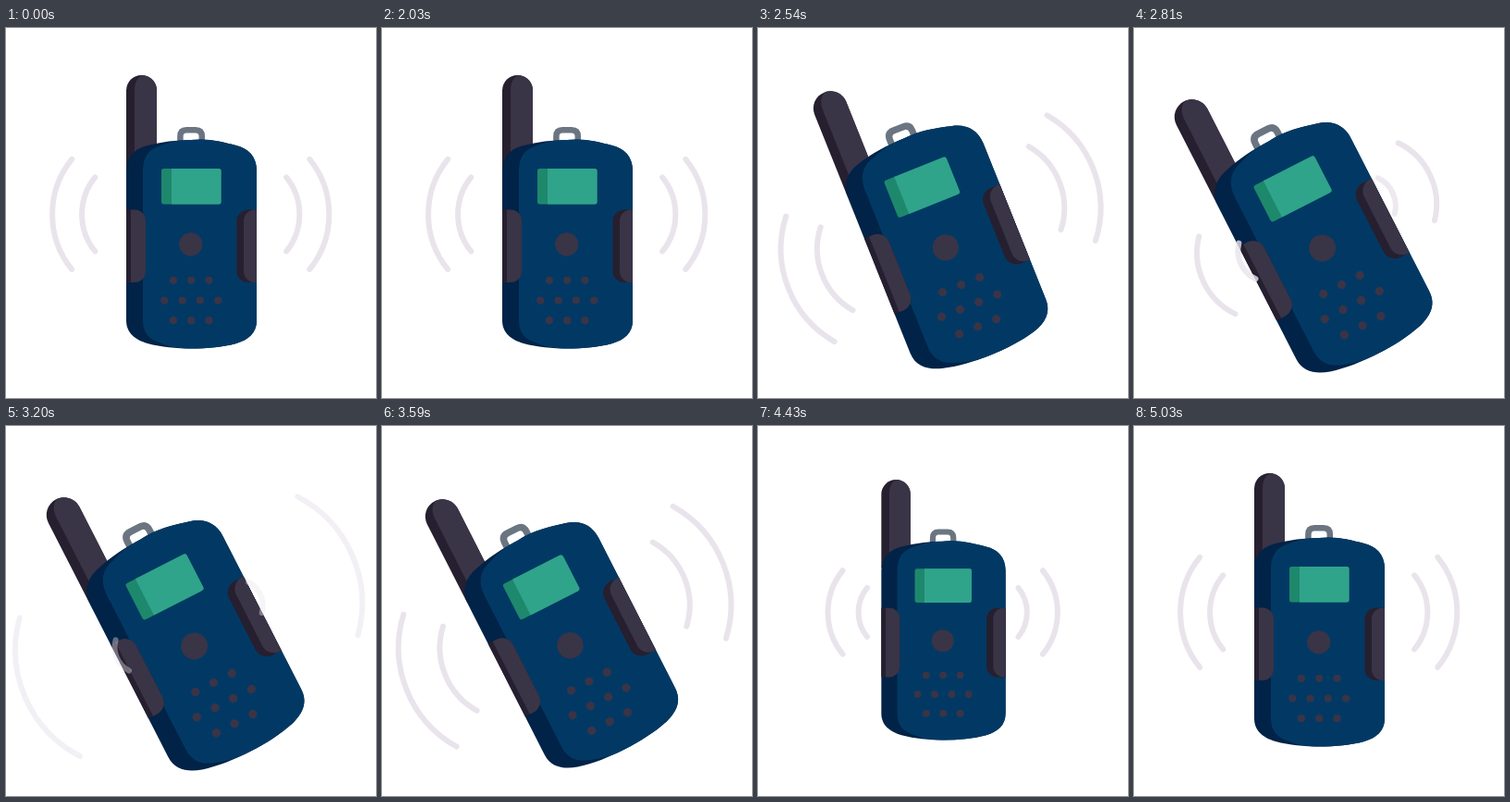
An HTML page with a canvas that plays this animation: 400x400 px, repeating every 5060 ms.

```html
<!DOCTYPE html>
<html lang="en">
<head>
<meta charset="utf-8">
<title>Walkie-talkie</title>
<style>
html, body { margin: 0; width: 100%; height: 100%; overflow: hidden; background: #fff; }
canvas { display: block; width: 400px; height: 400px; }
</style>
</head>
<body>
<canvas id="stage"></canvas>
<script>
const canvas = document.getElementById('stage');
const ctx = canvas.getContext('2d');
const dpr = window.devicePixelRatio || 1;
canvas.width = canvas.height = 400 * dpr;

const LOOP = 5060, START = 2030, END = 5030;
const BODY = '#023964', SIDE = '#002347', DARK = '#261f2f', GREY = '#3a3447';
const WAVE = '#e9e4ec', SPEED = 0.135, SPAN = 39 * Math.PI / 180;

const clamp = x => Math.max(0, Math.min(1, x));
const ease = x => (1 - Math.cos(Math.PI * clamp(x))) / 2;
const phase = (t, from, to) => ease((t - from) / (to - from));

// Birth times of each pulse: outer arc, inner arc, tilted with the device or not
const pulses = [
  [2060, 2222, true],
  [2512, 2673, true],
  [3084, 3268, true],
  [4080, 4225, false],
  [4589, 4734, false]
];

function fillPath(color, d) {
  ctx.fillStyle = color;
  ctx.fill(new Path2D(d));
}

function box(color, x, y, w, h, r) {
  ctx.fillStyle = color;
  ctx.beginPath();
  ctx.roundRect(x, y, w, h, r);
  ctx.fill();
}

function dot(x, y, r) {
  ctx.fillStyle = GREY;
  ctx.beginPath();
  ctx.arc(x, y, r, 0, 7);
  ctx.fill();
}

function drawDevice() {
  // antenna
  box(DARK, 130, 51, 33, 100, [16.5, 16.5, 0, 0]);
  fillPath(GREY, 'M139 151V67C139 59 142 53 148 51C157 52 163 59 163 67V151Z');

  // strap loop
  ctx.strokeStyle = '#6b7582';
  ctx.lineWidth = 6.5;
  ctx.stroke(new Path2D('M188.4 126V117Q188.4 110.2 195 110.2H205Q211.8 110.2 211.8 117V126'));

  // case
  const right = 'C218 119 234 123 249 127C262 130 271 139 271 154V316' +
    'C271 330 262 337 249 341C234 345 218 346.5 201 346.5';
  fillPath(SIDE, 'M200 121' + right + 'C184 346.5 168 345 153 341C140 337 130 330 130 316V154' +
    'C130 139 140 130 153 127C168 123 184 121 200 121Z');
  fillPath(BODY, 'M200 121' + right + 'C188 346.5 178 345 168 341C155 337 148 330 148 316V154' +
    'C148 139 155 130 168 127C178 123 188 121 200 121Z');

  // grips
  box(DARK, 130, 196.5, 21, 78.5, [0, 12, 12, 0]);
  box(GREY, 135, 196.5, 16, 78.5, [0, 12, 12, 0]);
  box(DARK, 249.5, 196.5, 21.5, 78.5, [12, 0, 0, 12]);
  box(GREY, 257, 196.5, 14, 78.5, [12, 0, 0, 12]);

  // screen
  box('#1e886c', 168, 152, 64.5, 38.5, 2.5);
  box('#30a38b', 179, 152, 53.5, 38.5, [0, 2.5, 2.5, 0]);

  // button and speaker
  dot(199.7, 233.8, 12.6);
  for (let row = 0; row < 3; row++) {
    const n = row === 1 ? 4 : 3;
    for (let i = 0; i < n; i++) dot(200.2 + (i - (n - 1) / 2) * 19.3, 272.8 + row * 21.7, 4.1);
  }
}

// A mirrored pair of arcs; size is half the chord before scaling
function drawArcs(size, scale, tilt, tilted, drift = 0) {
  const alpha = Math.min(clamp((size - 13) / 7), clamp((74 - size) / 5));
  if (alpha <= 0) return;
  const r = size * scale * 1.59;
  const c = Math.min(55, 45.6 + 0.21 * size) * scale + drift;
  ctx.save();
  ctx.globalAlpha = alpha;
  ctx.strokeStyle = WAVE;
  ctx.lineWidth = 6;
  ctx.lineCap = 'round';
  if (tilted) {
    ctx.translate(197.6, 216.7);
    ctx.rotate(tilt);
  } else {
    ctx.translate(199.7, 201.4);
  }
  ctx.beginPath();
  ctx.arc(c, 0, r, -SPAN, SPAN);
  ctx.stroke();
  ctx.beginPath();
  ctx.arc(-c, 0, r, Math.PI - SPAN, Math.PI + SPAN);
  ctx.stroke();
  ctx.restore();
}

function drawWaves(t, scale, turn) {
  const dt = t - START, x = dt / 300;
  drawArcs(59.5 + 14.5 * x * x, scale, 0, false, dt * 0.01);
  drawArcs(40 + 8 * x ** 3, scale, 0, false, dt * 0.01);
  const tilt = turn * (1 - 0.19 * clamp((t - 2330) / 1260));
  for (const [outer, inner, tilted] of pulses) {
    for (const born of [outer, inner]) {
      drawArcs((t - born) * SPEED, scale, tilt, tilted);
    }
  }
}

function draw(now) {
  let t = now % LOOP;
  if (t < START || t >= END) t = START;

  const scale = 1 + 0.145 * phase(t, 2030, 2740) - 0.227 * phase(t, 3470, 4090) +
    0.082 * phase(t, 4090, 4850);
  const turn = -27.1 * Math.PI / 180 * (phase(t, 2030, 2750) - phase(t, 3570, 4100));

  ctx.setTransform(dpr, 0, 0, dpr, 0, 0);
  ctx.fillStyle = '#fff';
  ctx.fillRect(0, 0, 400, 400);

  ctx.save();
  ctx.translate(200, 200);
  ctx.scale(scale, scale);
  ctx.translate(0, 26.3);
  ctx.rotate(turn);
  ctx.translate(-200, -226.3);
  drawDevice();
  ctx.restore();

  drawWaves(t, scale, turn);
}

const origin = performance.now();
function tick() {
  draw(performance.now() - origin);
  requestAnimationFrame(tick);
}
tick();
</script>
</body>
</html>
```
